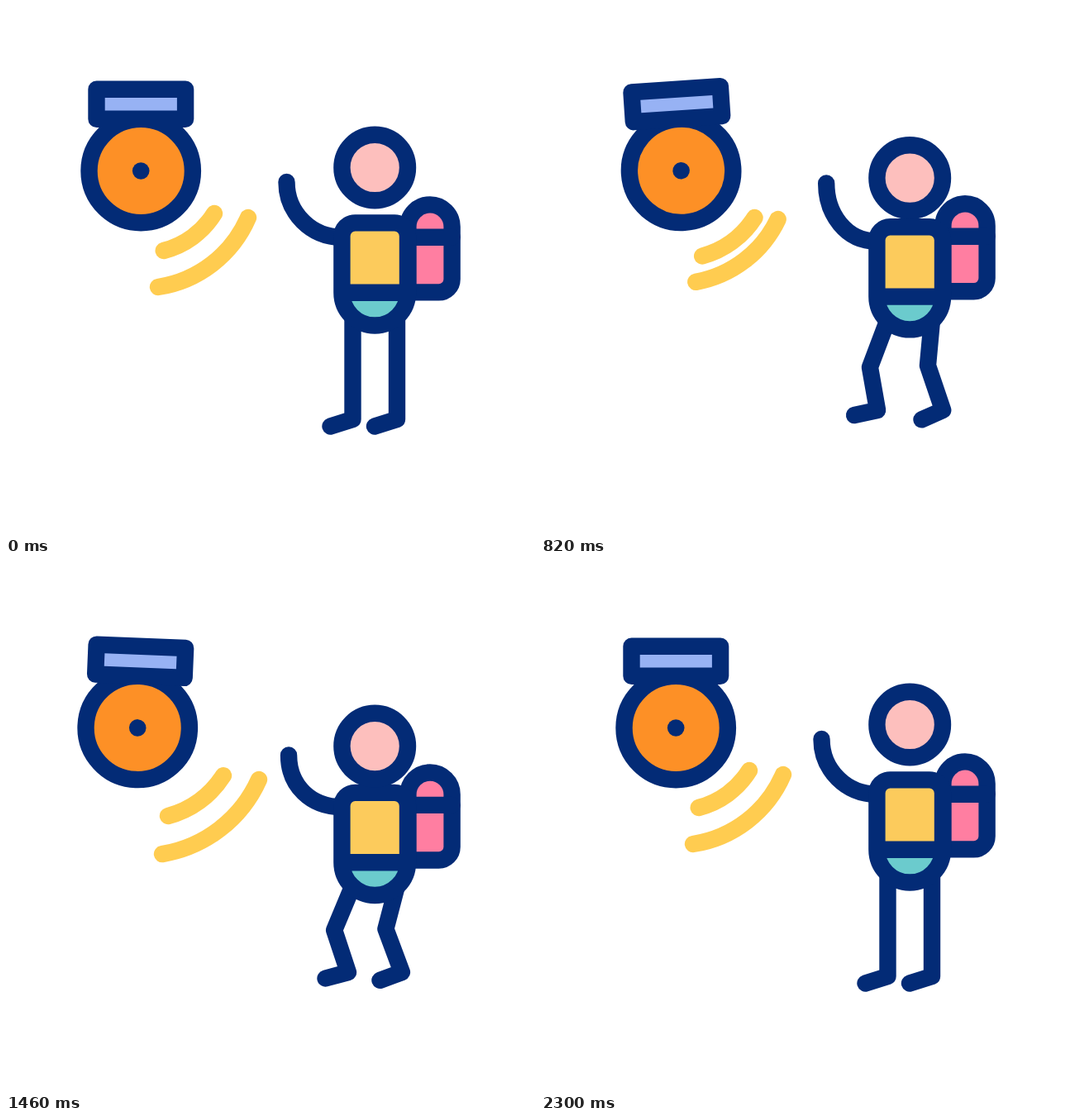
Animation of 640 by 640 pixels, one loop 2.4 s. Source, as an HTML page:

```html
<!DOCTYPE html>
<html lang="en">
<head>
<meta charset="utf-8">
<title>School bell</title>
<style>
  html, body { margin: 0; width: 100%; height: 100%; overflow: hidden; background: #fff; }
  svg { display: block; width: 100%; height: 100%; }
  .ink { stroke: #032b76; stroke-width: 20.4; stroke-linecap: round; stroke-linejoin: round; fill: none; }
  .wave { stroke: #ffcc50; stroke-width: 20.4; stroke-linecap: round; fill: none; }
</style>
</head>
<body>
<svg viewBox="0 0 640 640">
  <path id="inner" class="wave"/>
  <path id="outer" class="wave"/>

  <g id="bell">
    <circle class="ink" cx="163.2" cy="199.5" r="62.7" style="fill:#fd9026"/>
    <circle cx="163.2" cy="199.5" r="10.3" fill="#032b76"/>
    <rect class="ink" x="109.5" y="100.8" width="107.6" height="35.9" style="fill:#97b2f4"/>
  </g>

  <g id="pack">
    <path class="ink" style="fill:#ff7ea1"
      d="M486.4 346.4V267a26.6 26.6 0 0 1 53.2 0V330.4a16 16 0 0 1-16 16Z"/>
    <path class="ink" d="M486.4 279.8H539.6"/>
  </g>
  <path id="legL" class="ink"/>
  <path id="legR" class="ink"/>
  <path id="arm" class="ink"/>
  <g id="body">
    <path d="M406.4 346.7V262.4H486V346.7Z" fill="#fccb5c"/>
    <path d="M406.4 346.7a39.8 39.8 0 0 0 79.6 0Z" fill="#6bcbcd"/>
    <path class="ink" d="M406.4 346.7V278.4a16 16 0 0 1 16-16H470a16 16 0 0 1 16 16V346.7a39.8 39.8 0 0 1-79.6 0H486"/>
  </g>
  <circle id="head" class="ink" cx="446.2" cy="195.5" r="39.8" style="fill:#fdbfbd"/>
</svg>
<script>
const LOOP = 2400, STEP = 20;
const el = id => document.getElementById(id);

// Wave poses: start x, y, end x, y, radius
const INNER = {
  rest:  [190.7, 296, 252, 251, 101],
  wide:  [196.1, 306.5, 263.6, 257.3, 113.5],
  small: [191.5, 287, 239, 251, 92]
};
const OUTER = {
  rest:  [184, 340, 293, 256, 142],
  wide:  [189.2, 354, 308, 262.4, 158],
  small: [185.9, 319.2, 271.1, 254.8, 121.4]
};

// Child poses: body, head and pack shift, then hand x, y
const CHILD = {
  rest:   [0, 0, 0, 339.5, 213],
  crouch: [24, 37, 24.5, 339.5, 247],
  jump:   [-23, -23, -38.5, 353.5, 167]
};
// Leg poses: knee, ankle, toe
const LEFT = {
  rest:   [419.5, 442.5, 419.5, 500, 392.5, 508.5],
  crouch: [396.5, 450, 419.5, 500, 392.5, 508.5],
  jump:   [400, 418, 389, 473, 359.5, 475.5]
};
const RIGHT = {
  rest:   [473, 442.5, 473, 500, 446, 508.5],
  crouch: [452.5, 449, 473, 500, 446, 508.5],
  jump:   [490.5, 414.5, 505.6, 473, 481.7, 488.3]
};

const HOP = [[200, 'rest'], [600, 'crouch'], [1100, 'jump'], [1600, 'crouch'], [2000, 'rest']];
const PULSE = ['rest', 'wide', 'small', 'wide', 'small', 'rest'].map((name, i) => [200 + 400 * i, name]);
const SWING = Array.from({ length: 11 }, (_, i) =>
  [200 + 200 * i, i % 10 === 0 ? 'rest' : i % 2 ? 'left' : 'right']);
const TILT = { rest: [0], left: [-4], right: [4] };

const ease = x => (1 - Math.cos(Math.PI * x)) / 2;

// Blend the two poses around time t
function pose(keys, poses, t) {
  const last = keys.length - 1;
  if (t <= keys[0][0]) return poses[keys[0][1]];
  if (t >= keys[last][0]) return poses[keys[last][1]];
  const i = keys.findIndex(k => k[0] > t);
  const [t0, from] = keys[i - 1], [t1, to] = keys[i];
  const k = ease((t - t0) / (t1 - t0));
  return poses[from].map((v, j) => v + (poses[to][j] - v) * k);
}

function drawWave(id, poses, t) {
  const [x0, y0, x1, y1, r] = pose(PULSE, poses, t);
  el(id).setAttribute('d', `M${x0} ${y0}A${r} ${r} 0 0 0 ${x1} ${y1}`);
}

function drawLeg(id, hipX, hipY, poses, t) {
  el(id).setAttribute('d', `M${hipX} ${hipY}L${pose(HOP, poses, t).join(' ')}`);
}

function shift(id, dy) {
  el(id).setAttribute('transform', `translate(0 ${dy})`);
}

function draw(t) {
  el('bell').setAttribute('transform', `rotate(${pose(SWING, TILT, t)[0]} 163.2 103)`);
  drawWave('outer', OUTER, t);
  drawWave('inner', INNER, t - 100);

  const [body, head, pack, hx, hy] = pose(HOP, CHILD, t);
  shift('body', body);
  shift('head', head);
  shift('pack', pack);
  drawLeg('legL', 419.5, 375 + body, LEFT, t);
  drawLeg('legR', 473, 375 + body, RIGHT, t);
  const sy = 279.7 + body;
  el('arm').setAttribute('d', `M${hx} ${hy}C${hx} ${hy + 37} 369 ${sy} 406 ${sy}`);
}

const start = performance.now();
function tick() {
  const t = Math.max(0, performance.now() - start) % LOOP;
  draw(Math.floor(t / STEP) * STEP);
  requestAnimationFrame(tick);
}
tick();
</script>
</body>
</html>
```
